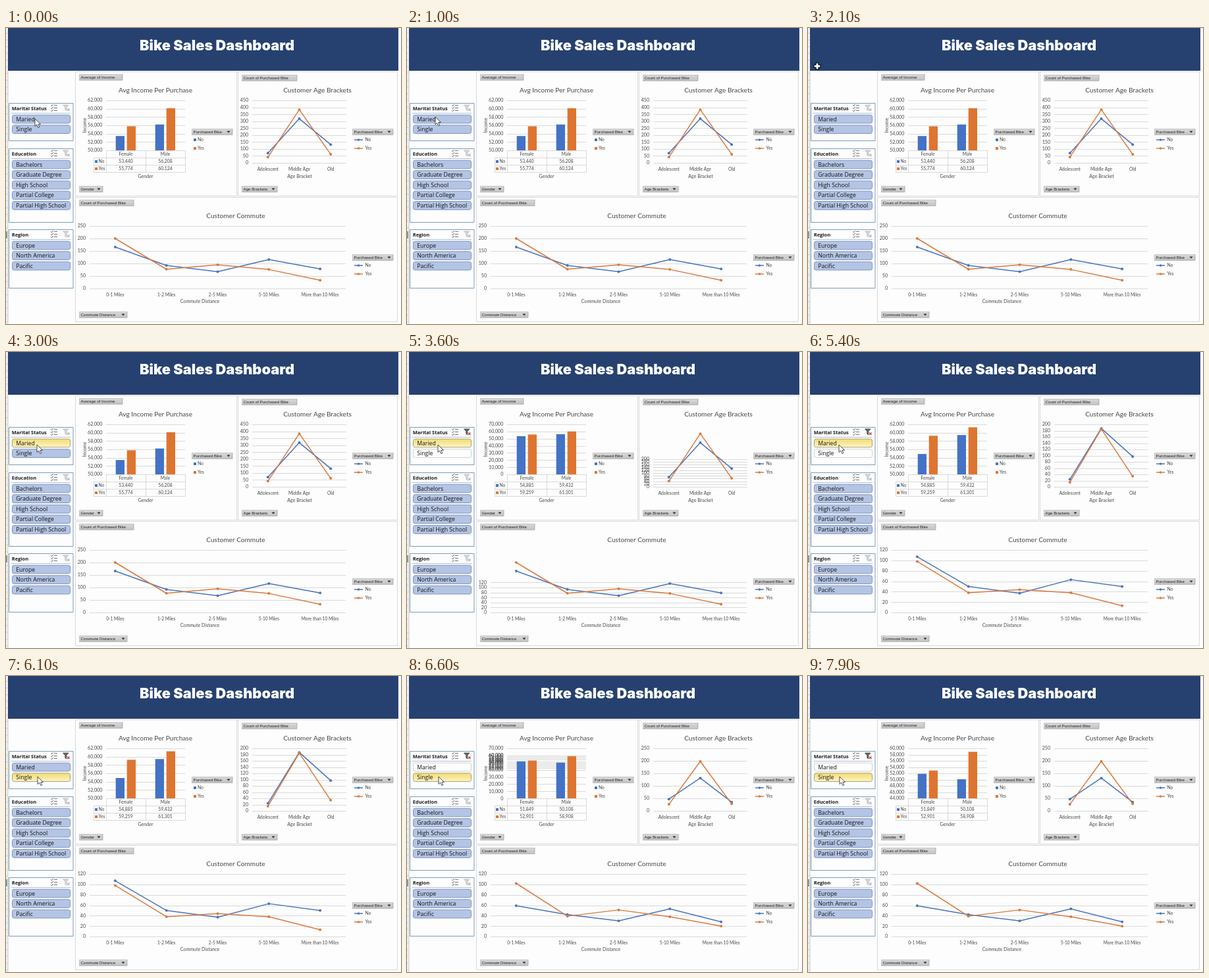
Write an HTML page with a canvas that moves like this. It is 600 px wide and 450 px high and loops after 8000 ms.

```html
<!DOCTYPE html>
<html lang="en">
<head>
<meta charset="utf-8">
<title>Bike Sales Dashboard</title>
<style>
html, body { margin: 0; width: 100%; height: 100%; overflow: hidden; background: #fdfdfe; }
canvas { display: block; width: 600px; height: 450px; }
</style>
</head>
<body>
<canvas id="stage"></canvas>
<script>
const canvas = document.getElementById('stage');
const dpr = window.devicePixelRatio || 1;
canvas.width = 600 * dpr;
canvas.height = 450 * dpr;
const g = canvas.getContext('2d');

const LOOP = 8000, BLUE = '#4472c4', ORANGE = '#dd7531', GRID = '#d9d9d9', INK = '#484848';
const LINE_BLUE = '#4a74b9', LINE_ORANGE = '#d87a3e';
const LATO = 'Lato, "Open Sans", sans-serif';
const OPEN = '"Open Sans", "Noto Sans", sans-serif';
const HEAVY = 'Inter, "Open Sans", sans-serif';
const ARIAL = '"Liberation Sans", Arial, sans-serif';

// Each selection: [No, Yes] series for every chart plus its axes.
const SETS = {
  all: {
    income: [[53440, 56208], [55774, 60124]], range: [50000, 62000],
    age: [[70, 318, 132], [41, 383, 62]], ageMax: 450, ageStep: 50,
    miles: [[166, 92, 67, 116, 78], [200, 77, 95, 76, 33]], milesMax: 250, milesStep: 50
  },
  maried: {
    income: [[54885, 59432], [59259, 61301]], range: [50000, 62000],
    age: [[24, 187, 97], [15, 185, 34]], ageMax: 200, ageStep: 20,
    miles: [[107, 50, 37, 63, 50], [98, 38, 44, 38, 13]], milesMax: 120, milesStep: 20
  },
  single: {
    income: [[51849, 50108], [52901, 58908]], range: [44000, 60000],
    age: [[47, 131, 35], [26, 198, 28]], ageMax: 250, ageStep: 50,
    miles: [[59, 42, 30, 53, 28], [102, 39, 51, 38, 20]], milesMax: 120, milesStep: 20
  }
};
const CLICKS = [
  { at: 3600, from: 'all', to: 'maried' },
  { at: 6300, from: 'maried', to: 'single' }
];
const DATA_MS = 300, AXIS_MS = 570;

// Pointer path: time, x, y
const PATH = [
  [0, 44, 138], [900, 44, 138], [1800, 14, 58], [2350, 14, 58],
  [2800, 47, 141], [5700, 47, 141], [6050, 48, 153], [8000, 48, 153]
];

const clamp = v => Math.max(0, Math.min(1, v));
const mix = (a, b, k) => a + (b - a) * k;
const smooth = k => k * k * (3 - 2 * k);
const easeOut = k => 1 - (1 - k) ** 3;
const mixAll = (a, b, k) => a.map((row, i) => row.map((v, j) => mix(v, b[i][j], k)));

function box(x, y, w, h, fill, stroke, r = 0) {
  g.beginPath();
  if (r) g.roundRect(x, y, w, h, r); else g.rect(x, y, w, h);
  if (fill) { g.fillStyle = fill; g.fill(); }
  if (stroke) { g.strokeStyle = stroke; g.lineWidth = 1; g.stroke(); }
}

function line(points, color, width = 1) {
  g.beginPath();
  points.forEach(([x, y]) => g.lineTo(x, y));
  g.strokeStyle = color;
  g.lineWidth = width;
  g.stroke();
}

function shape(points, fill, stroke) {
  g.beginPath();
  points.forEach(([x, y]) => g.lineTo(x, y));
  g.closePath();
  if (fill) { g.fillStyle = fill; g.fill(); }
  if (stroke) { g.strokeStyle = stroke; g.lineWidth = 0.8; g.stroke(); }
}

function dot(x, y, color, r = 2) {
  g.beginPath();
  g.arc(x, y, r, 0, 7);
  g.fillStyle = color;
  g.fill();
}

// y is the vertical middle of the capitals
function text(s, x, y, size, { font = LATO, align = 'left', color = INK, weight = 400 } = {}) {
  g.font = `${weight} ${size}px ${font}`;
  g.textAlign = align;
  g.textBaseline = 'alphabetic';
  g.fillStyle = color;
  g.fillText(s, x, y + size * 0.35);
}

const center = (s, x, y, size) => text(s, x, y, size, { align: 'center' });
const right = (s, x, y, size) => text(s, x, y, size, { align: 'right' });
const grid = (x1, x2, y) => line([[x1, Math.round(y) + 0.5], [x2, Math.round(y) + 0.5]], GRID);

function fieldButton(s, x, y, w, arrow) {
  const fill = g.createLinearGradient(0, y, 0, y + 9);
  fill.addColorStop(0, '#dadada');
  fill.addColorStop(1, '#c3c3c3');
  box(x + 0.5, y + 0.5, w - 1, 8.5, fill, '#c6c6c6');
  line([[x, y + 9.3], [x + w, y + 9.3], [x + w, y]], '#a9a9a9', 0.8);
  text(s, x + 2.5, y + 4.6, 6.2, { font: ARIAL, color: '#222' });
  if (arrow) {
    const ax = x + w - 6, ay = y + 3.5;
    shape([[ax - 2.6, ay], [ax + 2.6, ay], [ax, ay + 3]], '#333');
  }
}

function legend(x, y, lines) {
  fieldButton('Purchased Bike', x, y, 62, true);
  ['No', 'Yes'].forEach((name, i) => {
    const cy = y + 17 + i * 13;
    if (lines) {
      const color = i ? LINE_ORANGE : LINE_BLUE;
      line([[x + 3, cy], [x + 16, cy]], color, 1.5);
      dot(x + 9.5, cy, color, 1.8);
      text(name, x + 19.5, cy, 6.8);
    } else {
      box(x + 3, cy - 2, 4, 4, i ? ORANGE : BLUE);
      text(name, x + 9, cy, 6.8);
    }
  });
}

function slicerIcons(y, active) {
  for (let i = 0; i < 3; i++) {
    const cy = y - 4 + i * 4;
    line([[68, cy], [69.5, cy + 1.3], [71.8, cy - 1.5]], '#555', 0.9);
    line([[73, cy], [78, cy]], '#777', 1);
  }
  const tone = active ? '#444' : '#bcbcbc';
  shape([[86.5, y - 4.5], [95, y - 4.5], [91.8, y - 0.8], [91.8, y + 4.5], [89.8, y + 3], [89.8, y - 0.8]],
    active ? '#666' : '#d5d5d5', tone);
  const cross = active ? '#c8452f' : '#b5b5b5';
  line([[93, y + 1], [96.5, y + 4.5]], cross, 1.2);
  line([[96.5, y + 1], [93, y + 4.5]], cross, 1.2);
}

function slicer(title, y, h, items, mode, hover) {
  box(4.5, y + 0.5, 97.5, h - 1, '#fdfdfe', '#7d9db5');
  text(title, 8.7, y + 8, 7.5, { font: OPEN, weight: 700, color: '#1c1c1c' });
  slicerIcons(y + 7.5, mode !== 'all');
  line([[8, y + 15.5], [98, y + 15.5]], '#b3c3dc');
  items.forEach((name, i) => {
    const cy = y + 24.5 + i * 15.6, key = name.toLowerCase();
    const on = mode === 'all' || mode === key;
    let fill = on ? '#b4c4e4' : '#fdfdfe', edge = on ? '#8195bd' : '#cfcfcf';
    if (hover === key) {
      fill = g.createLinearGradient(0, cy - 6.5, 0, cy + 6.5);
      fill.addColorStop(0, '#f3dc78');
      fill.addColorStop(0.35, '#f6e488');
      fill.addColorStop(1, '#fdf5cd');
      edge = '#a9a27c';
    }
    box(9.5, cy - 6.3, 88, 12.6, fill, edge, 2.8);
    text(name, 15.2, cy, 8.7, { font: OPEN, color: '#141414' });
  });
}

function incomeAxis(y, first, last, step) {
  for (let v = first; v <= last; v += step) {
    const py = y(v);
    if (py < 108 || py > 196) continue;
    if (py < 186) grid(152, 272, py);
    right(v.toLocaleString('en-US'), 146.3, py, 7.1);
  }
}

function incomeChart(s) {
  const { lo, hi } = s;
  const y = v => 186 - (v - lo) / (hi - lo) * 76;
  center('Avg Income Per Purchase', 227, 94, 10.1);
  if (s.coarse) incomeAxis(y, 0, 70000, 10000);
  if (s.fine) incomeAxis(y, s.range[0] - (s.moving ? 2000 : 0), s.range[1], 2000);
  s.income.forEach((row, i) => row.forEach((v, j) => {
    const top = y(v);
    box(166.7 + j * 60 + i * 17, top, 13.3, 186 - top, i ? ORANGE : BLUE);
  }));
  [[186, 152], [197, 133], [208, 133], [219, 133]].forEach(([ly, x]) => grid(x, 272, ly));
  [152, 212, 272].forEach(x => line([[x + 0.5, 186], [x + 0.5, 219.5]], GRID));
  line([[133.5, 197], [133.5, 219.5]], GRID);
  ['Female', 'Male'].forEach((name, j) => center(name, 182 + j * 60, 192, 6.7));
  ['No', 'Yes'].forEach((name, i) => {
    const cy = 203 + i * 11;
    box(135, cy - 2, 4, 4, i ? ORANGE : BLUE);
    text(name, 140.5, cy, 6.7);
    s.table[i].forEach((v, j) => center(v.toLocaleString('en-US'), 182 + j * 60, cy, 6.8));
  });
  center('Gender', 212, 226, 7.1);
  g.save();
  g.translate(119, 148);
  g.rotate(-Math.PI / 2);
  center('Income', 0, 0, 7.2);
  g.restore();
}

function lineChart({ x1, x2, top, bottom, names, rows, max, step, last }) {
  const y = v => bottom - v / max * (bottom - top);
  for (let v = 0; v <= last; v += step) {
    const py = y(v);
    if (py < top - 1) continue;
    grid(x1, x2, py);
    right(String(v), x1 - 6, py, 7.1);
  }
  const gap = (x2 - x1) / names.length;
  const px = i => x1 + gap * (i + 0.5);
  names.forEach((name, i) => center(name, px(i), bottom + 9.3, 6.6));
  rows.forEach((row, k) => {
    const color = k ? LINE_ORANGE : LINE_BLUE;
    const pts = row.map((v, i) => [px(i), y(v)]);
    g.lineJoin = 'round';
    line(pts, color, 1.5);
    pts.forEach(([x, py]) => dot(x, py, color, 2));
  });
}

function stateAt(t) {
  const click = CLICKS.filter(c => t >= c.at).pop();
  if (!click) {
    const s = SETS.all;
    return { ...s, mode: 'all', table: s.income, lo: s.range[0], hi: s.range[1], fine: true };
  }
  const a = SETS[click.from], b = SETS[click.to], dt = t - click.at;
  const k = smooth(clamp(dt / DATA_MS));
  const z = easeOut(clamp((dt - DATA_MS) / AXIS_MS));
  return {
    ...b, mode: click.to, table: b.income,
    income: mixAll(a.income, b.income, k),
    age: mixAll(a.age, b.age, k), ageMax: mix(a.ageMax, b.ageMax, k), ageLast: b.ageMax,
    miles: mixAll(a.miles, b.miles, k), milesMax: mix(a.milesMax, b.milesMax, k), milesLast: b.milesMax,
    lo: mix(0, b.range[0], z), hi: mix(70000, b.range[1], z),
    coarse: z < 0.9, fine: dt >= DATA_MS, moving: z < 1
  };
}

function pointerAt(t) {
  const i = PATH.findIndex(p => p[0] > t);
  const a = PATH[i - 1], b = PATH[i];
  const k = smooth((t - a[0]) / (b[0] - a[0]));
  return [mix(a[1], b[1], k), mix(a[2], b[2], k)];
}

function drawPointer(x, y) {
  if (y < 110) {
    const plus = (r, w, color) => {
      line([[x - r, y], [x + r, y]], color, w);
      line([[x, y - r], [x, y + r]], color, w);
    };
    plus(5.5, 5.5, '#111');
    plus(4.3, 2.8, '#fff');
    return;
  }
  const arrow = [[0, 0], [0, 11.5], [2.7, 9], [4.8, 13.5], [6.8, 12.6], [4.8, 8.3], [8.5, 8.3]];
  shape(arrow.map(([dx, dy]) => [x + dx, y + dy]), '#fff', '#222');
}

function draw(t) {
  const s = stateAt(t);
  const [mx, my] = pointerAt(t);
  let hover = '';
  if (t > 2500 && my > 132) hover = my < 146 ? 'maried' : 'single';

  g.setTransform(dpr, 0, 0, dpr, 0, 0);
  box(0, 0, 600, 450, '#fdfdfe');
  box(0, 0, 3, 450, '#f1f1f1');
  for (let y = 8; y < 450; y += 10.2) line([[0, y], [2.5, y]], '#c4c4c4', 0.8);
  line([[3, 65], [3, 450]], '#b9c0c4', 0.8);
  box(0, 309, 2, 11, '#8a9a92');
  box(3, 0, 593, 65, '#264170');
  text('Bike Sales Dashboard', 320.5, 26, 21.8, { font: HEAVY, weight: 900, color: '#fff', align: 'center' });

  box(105.5, 66.5, 245, 189, '#fdfdfe', GRID);
  box(352.5, 66.5, 242, 189, '#fdfdfe', GRID);
  box(105.5, 257.5, 489, 189, '#fdfdfe', GRID);

  slicer('Marital Status', 114, 58, ['Maried', 'Single'], s.mode, hover);
  slicer('Education', 183, 113,
    ['Bachelors', 'Graduate Degree', 'High School', 'Partial College', 'Partial High School'], 'all');
  slicer('Region', 306, 90, ['Europe', 'North America', 'Pacific'], 'all');

  fieldButton('Average of Income', 111, 70, 66);
  fieldButton('Count of Purchased Bike', 358, 71, 84);
  fieldButton('Count of Purchased Bike', 111, 261, 83);
  fieldButton('Gender', 111, 240, 36, true);
  fieldButton('Age Brackets', 358, 240, 54, true);
  fieldButton('Commute Distance', 111, 431, 73, true);

  incomeChart(s);
  legend(282, 153, false);

  center('Customer Age Brackets', 473, 94, 10.1);
  lineChart({
    x1: 374, x2: 517, top: 110, bottom: 205, names: ['Adolescent', 'Middle Age', 'Old'],
    rows: s.age, max: s.ageMax, step: s.ageStep, last: s.ageLast || s.ageMax
  });
  center('Age Bracket', 446, 225.5, 7.1);
  legend(526, 153, true);

  center('Customer Commute', 349, 285, 10.1);
  lineChart({
    x1: 127, x2: 516, top: 301, bottom: 396,
    names: ['0-1 Miles', '1-2 Miles', '2-5 Miles', '5-10 Miles', 'More than 10 Miles'],
    rows: s.miles, max: s.milesMax, step: s.milesStep, last: s.milesLast || s.milesMax
  });
  center('Commute Distance', 294.5, 416, 7.1);
  legend(526, 344, true);

  drawPointer(mx, my);
}

const start = performance.now();
function frame() {
  draw((performance.now() - start) % LOOP);
  requestAnimationFrame(frame);
}
frame();
</script>
</body>
</html>
```
